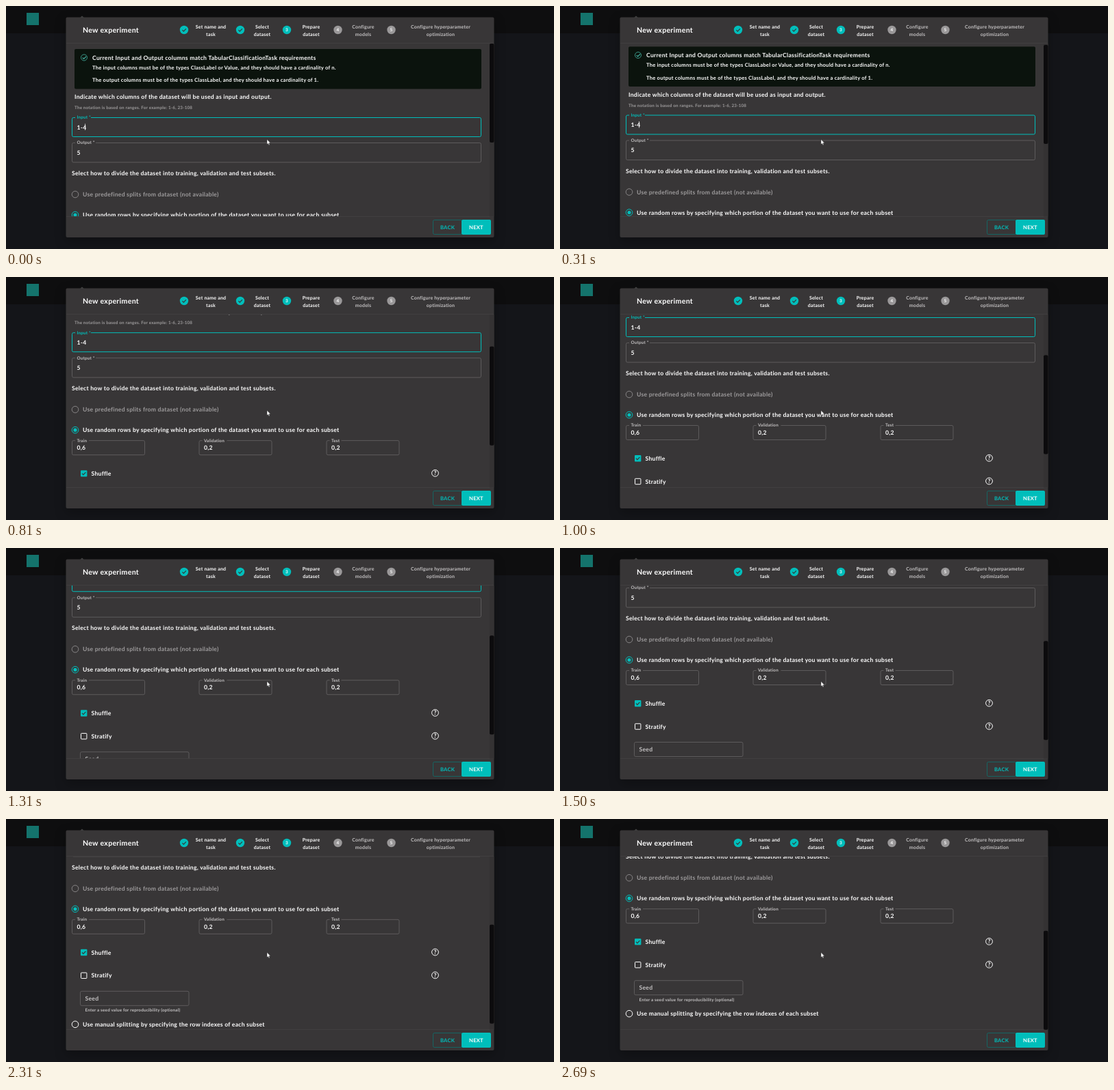
An HTML page for the animation above (2.81 s loop, 800 by 356 pixels).

```html
<!DOCTYPE html>
<html lang="en">
<head>
<meta charset="utf-8">
<title>New experiment</title>
<style>
  html, body { margin: 0; width: 100%; height: 100%; overflow: hidden; background: #141519; }
  svg { display: block; }
  text {
    font: 700 8.64px Lato, sans-serif;
    letter-spacing: .028em;
    fill: #fff;
    text-rendering: geometricPrecision;
  }
  .title { font-size: 10.55px; }
  .medium { font-size: 7.62px; }
  .step { font-size: 7px; }
  .small { font-size: 6.3px; }
  .center { text-anchor: middle; }
  .dim { fill: #9d9b9c; }
  .soft { fill: #c4c2c3; }
  .teal { fill: #00bebb; }
  .line { fill: none; stroke: #676566; stroke-width: .8; }
  .accent { stroke: #00bebb; stroke-width: 1; }
  .white { stroke: #fff; stroke-width: 1; }
  .gray { stroke: #8f8d8e; stroke-width: .9; }
  .dialog { fill: #383637; filter: drop-shadow(0 6px 8px #0004); }
</style>
</head>
<body>
<svg width="800" height="356" viewBox="0 0 800 356">
  <defs><clipPath id="view"><rect x="88" y="55" width="618" height="253"/></clipPath></defs>
  <rect width="800" height="356" fill="#141519"/>
  <rect width="800" height="40" fill="#0e0e0f"/>
  <rect x="30" y="10" width="18" height="18" fill="#14736c"/>
  <path d="M106 19l5-4.500 5 4.500z" fill="#4a4a4b"/>
  <rect class="dialog" x="87.500" y="16.500" width="625" height="322.500" rx="2"/>
  <g id="header"></g>
  <path d="M88 54.500H712M88 308.500H712" stroke="#444243" stroke-width=".8"/>
  <g clip-path="url(#view)"><g id="content"></g></g>
  <rect x="706" y="55" width="6.500" height="253.500" fill="#343233"/>
  <rect id="thumb" x="706" y="55" width="6.500" height="145" rx="2" fill="#0c0b0d"/>
  <g id="footer"></g>
  <path d="M381 195.500v7.300l1.700-1.500 1.100 2.400 1.200-.5-1.100-2.400h2.300z" fill="#fff" stroke="#222" stroke-width=".4"/>
</svg>
<script>
const $ = id => document.getElementById(id);

const text = (x, y, string, cls = '') => `<text x="${x}" y="${y}" class="${cls}">${string}</text>`;
const rect = (x, y, w, h, attrs, r = 2) =>
  `<rect x="${x}" y="${y}" width="${w}" height="${h}" rx="${r}" ${attrs}/>`;
const circle = (x, y, r, attrs) => `<circle cx="${x}" cy="${y}" r="${r}" ${attrs}/>`;
const tick = (x, y, color) =>
  `<path d="M${x - 2.6} ${y}l1.900 1.900 3.500-3.700" fill="none" stroke="${color}" stroke-width="1.200"/>`;

// Outlined box with a label set into its top edge
function field(x, y, w, h, label, gap, value, focused) {
  return rect(x, y, w, h, `class="line ${focused ? 'accent' : ''}"`) +
    `<path d="M${x + 4.5} ${y}h${gap}" stroke="#383637" stroke-width="2"/>` +
    text(x + 7, y + 1.9, label, 'small ' + (focused ? 'teal' : 'soft')) +
    text(x + 7, y + h / 2 + 3, value);
}

function radio(y, label, state) {
  const ring = { on: 'accent', off: 'white', disabled: 'gray' }[state];
  return circle(101, y, 4.8, `class="line ${ring}"`) +
    (state === 'on' ? circle(101, y, 2.6, 'class="teal"') : '') +
    text(112, y + 3, label, state === 'disabled' ? 'dim' : '');
}

function checkbox(y, label, checked) {
  const box = checked
    ? rect(109, y - 4.7, 9.4, 9.4, 'class="teal"', 1) + tick(113.6, y, '#383637')
    : rect(109.5, y - 4.2, 8.4, 8.4, 'class="line white"', .8);
  return box + text(124.5, y + 3, label) +
    circle(626.5, y - .5, 4.9, 'class="line white"') +
    text(626.6, y + 2.5, '?', 'center');
}

function step(x, labelX, lines, number, state) {
  const color = state === 'later' ? '#9a9899' : '#00bebb';
  return circle(x, 35, 6.2, `fill="${color}"`) +
    (state === 'done' ? tick(x, 35.2, '#383637') : text(x, 37.2, number, 'small center')) +
    lines.map((s, i) => text(labelX, 32.8 + i * 10.7, s,
      'step center ' + (state === 'later' ? 'soft' : ''))).join('');
}

$('header').innerHTML =
  text(112, 39, 'New experiment', 'title') +
  step(260, 299, ['Set name and', 'task'], 1, 'done') +
  step(342, 374, ['Select', 'dataset'], 2, 'done') +
  step(410, 445.5, ['Prepare', 'dataset'], 3, 'active') +
  step(484.5, 521.5, ['Configure', 'models'], 4, 'later') +
  step(562.5, 634.5, ['Configure hyperparameter', 'optimization'], 5, 'later');

$('content').innerHTML =
  rect(100, 63, 594, 58.5, 'fill="#0b130d"') +
  circle(114, 75.5, 4.5, 'class="line" style="stroke:#45b5a4"') + tick(114.3, 75.6, '#45b5a4') +
  text(126, 78.5, 'Current Input and Output columns match TabularClassificationTask requirements') +
  text(126, 92.5, 'The input columns must be of the types ClassLabel or Value, and they should have a cardinality of n.', 'medium') +
  text(126, 111, 'The output columns must be of the types ClassLabel, and they should have a cardinality of 1.', 'medium') +
  text(100, 136, 'Indicate which columns of the dataset will be used as input and output.') +
  text(100, 151.2, 'The notation is based on ranges. For example: 1-6, 23-108', 'small dim') +
  field(96.5, 163.5, 597, 28, 'Input *', 23, '1-4', true) +
  '<path id="caret" d="M115.500 172.500v9.500" stroke="#fff" stroke-width=".7"/>' +
  field(96.5, 200.5, 597, 28.5, 'Output *', 30, '5') +
  text(96, 248, 'Select how to divide the dataset into training, validation and test subsets.') +
  radio(276, 'Use predefined splits from dataset (not available)', 'disabled') +
  radio(306, 'Use random rows by specifying which portion of the dataset you want to use for each subset', 'on') +
  field(96.5, 321.5, 106, 21, 'Train', 20, '0,6') +
  field(282, 321.5, 106, 21, 'Validation', 36, '0,2') +
  field(468, 321.5, 106, 21, 'Test', 17, '0,2') +
  checkbox(369.7, 'Shuffle', true) +
  checkbox(403.5, 'Stratify', false) +
  rect(108.5, 426.5, 158.5, 21, 'class="line"') +
  text(115.5, 440, 'Seed', 'soft') +
  text(115.5, 456.5, 'Enter a seed value for reproducibility (optional)', 'small soft') +
  radio(475, 'Use manual splitting by specifying the row indexes of each subset', 'off');

$('footer').innerHTML =
  rect(623.5, 313.5, 42, 21, 'class="line" style="stroke:#0d716f"') +
  rect(665, 313, 43, 22, 'class="teal"') +
  text(644.5, 326.8, 'BACK', 'medium center teal') +
  text(686.5, 326.8, 'NEXT', 'medium center');

// Scroll offset over time: [ms, px]
const scrollKeys = [
  [0, 0], [250, .5], [310, 3], [560, 52], [1000, 104], [1500, 142],
  [1690, 149.5], [2000, 149.5], [2060, 150.7], [2310, 174], [2560, 189.8]
];

function scrollAt(t) {
  const next = scrollKeys.findIndex(key => key[0] > t);
  if (next < 0) return scrollKeys.at(-1)[1];
  const [t0, y0] = scrollKeys[next - 1], [t1, y1] = scrollKeys[next];
  return y0 + (y1 - y0) * (t - t0) / (t1 - t0);
}

const LOOP = 2810, TICK = 62.5, LAST = 43;

function draw(now) {
  const t = Math.min(LAST, Math.floor((now % LOOP + 3) / TICK)) * TICK;
  const y = scrollAt(t);
  $('content').setAttribute('transform', `translate(0 ${-y})`);
  $('thumb').setAttribute('y', 55 + y * .5725);
  $('caret').setAttribute('opacity', t < 530 || t > 1030 ? 1 : 0);
  requestAnimationFrame(() => draw(performance.now() - start));
}

const start = performance.now();
draw(0);
</script>
</body>
</html>
```
